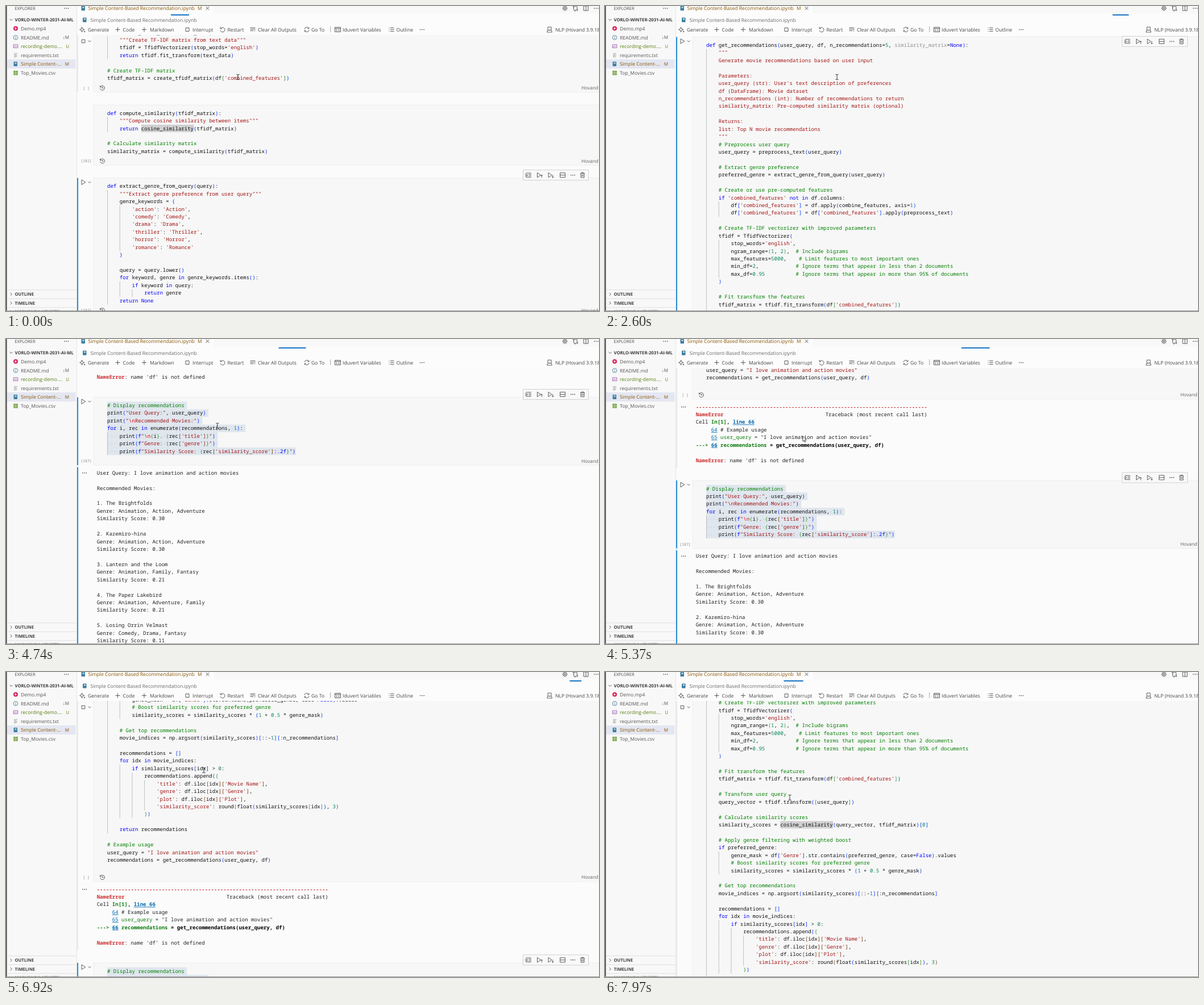
Animation of 1043x537 px, one loop 8000 ms. Source, as an HTML page:

```html
<!DOCTYPE html>
<html lang="en">
<head>
<meta charset="utf-8">
<title>Notebook</title>
<style>
html, body { margin: 0; width: 100%; height: 100%; overflow: hidden; background: #fcfcfc; }
svg { display: block; width: 100vw; height: 100vh; }
text { white-space: pre; text-rendering: geometricPrecision; font-family: "Open Sans", "Noto Sans", sans-serif; font-size: 8.65px; }
.mono text { font-family: "Noto Sans Mono", "DejaVu Sans Mono", monospace; font-size: 9.067px; }
.icon { fill: none; stroke: #4a4a4a; stroke-width: .9; }
</style>
</head>
<body>
<svg id="stage" viewBox="0 0 1043 537" preserveAspectRatio="none"></svg>
<script>
const LH = 13.43, CW = 5.44, CODE_X = 178, OUT_X = 159.7, LOOP = 8000;
const BLUE = '#0000ff', RED = '#a31515', GREEN = '#008000', ANSI_RED = '#cd3131', ANSI_GREEN = '#107c10', LINK = '#006ab1';
const BRACKETS = ['#0431fa', '#319331', '#7b3814'];
const KEYWORDS = /^(def|return|if|for|in|not|None|False)$/;

const CODE_A = String.raw`def create_tfidf_matrix(text_data):
    """Create TF-IDF matrix from text data"""
    tfidf = TfidfVectorizer(stop_words='english')
    return tfidf.fit_transform(text_data)

# Create TF-IDF matrix
tfidf_matrix = create_tfidf_matrix(df['combined_features'])`;

const CODE_B = String.raw`def compute_similarity(tfidf_matrix):
    """Compute cosine similarity between items"""
    return cosine_similarity(tfidf_matrix)

# Calculate similarity matrix
similarity_matrix = compute_similarity(tfidf_matrix)`;

const CODE_C = String.raw`def extract_genre_from_query(query):
    """Extract genre preference from user query"""
    genre_keywords = {
        'action': 'Action',
        'comedy': 'Comedy',
        'drama': 'Drama',
        'thriller': 'Thriller',
        'horror': 'Horror',
        'romance': 'Romance'
    }

    query = query.lower()
    for keyword, genre in genre_keywords.items():
        if keyword in query:
            return genre
    return None`;

const CODE_D = String.raw`def get_recommendations(user_query, df, n_recommendations=5, similarity_matrix=None):
    """
    Generate movie recommendations based on user input

    Parameters:
    user_query (str): User's text description of preferences
    df (DataFrame): Movie dataset
    n_recommendations (int): Number of recommendations to return
    similarity_matrix: Pre-computed similarity matrix (optional)

    Returns:
    list: Top N movie recommendations
    """
    # Preprocess user query
    user_query = preprocess_text(user_query)

    # Extract genre preference
    preferred_genre = extract_genre_from_query(user_query)

    # Create or use pre-computed features
    if 'combined_features' not in df.columns:
        df['combined_features'] = df.apply(combine_features, axis=1)
        df['combined_features'] = df['combined_features'].apply(preprocess_text)

    # Create TF-IDF vectorizer with improved parameters
    tfidf = TfidfVectorizer(
        stop_words='english',
        ngram_range=(1, 2),  # Include bigrams
        max_features=5000,    # Limit features to most important ones
        min_df=2,            # Ignore terms that appear in less than 2 documents
        max_df=0.95          # Ignore terms that appear in more than 95% of documents
    )

    # Fit transform the features
    tfidf_matrix = tfidf.fit_transform(df['combined_features'])

    # Transform user query
    query_vector = tfidf.transform([user_query])

    # Calculate similarity scores
    similarity_scores = cosine_similarity(query_vector, tfidf_matrix)[0]

    # Apply genre filtering with weighted boost
    if preferred_genre:
        genre_mask = df['Genre'].str.contains(preferred_genre, case=False).values
        # Boost similarity scores for preferred genre
        similarity_scores = similarity_scores * (1 + 0.5 * genre_mask)

    # Get top recommendations
    movie_indices = np.argsort(similarity_scores)[::-1][:n_recommendations]

    recommendations = []
    for idx in movie_indices:
        if similarity_scores[idx] > 0:
            recommendations.append({
                'title': df.iloc[idx]['Movie Name'],
                'genre': df.iloc[idx]['Genre'],
                'plot': df.iloc[idx]['Plot'],
                'similarity_score': round(float(similarity_scores[idx]), 3)
            })

    return recommendations

# Example usage
user_query = "I love animation and action movies"
recommendations = get_recommendations(user_query, df)
`;

const CODE_E = String.raw`# Display recommendations
print("User Query:", user_query)
print("\nRecommended Movies:")
for i, rec in enumerate(recommendations, 1):
    print(f"\n{i}. {rec['title']}")
    print(f"Genre: {rec['genre']}")
    print(f"Similarity Score: {rec['similarity_score']:.2f}")`;

// Output lines are lists of [text, colour, bold, underlined].
const ERROR_OUT = [
  [['-'.repeat(75), ANSI_RED, 1]],
  [['NameError', ANSI_RED, 1], [' '.repeat(33) + 'Traceback (most recent call last)']],
  [['Cell '], ['In[1]', ANSI_GREEN, 1], [', ', '#222', 1], ['line 66', LINK, 1, 1]],
  [['     '], ['64', LINK, 0, 1], [' # Example usage']],
  [['     '], ['65', LINK, 0, 1], [' user_query', ANSI_GREEN], [' = "I love animation and action movies"']],
  [['---> ', ANSI_GREEN, 1], ['66', LINK, 1, 1], [' recommendations', ANSI_GREEN, 1], [' = get_recommendations(user_query, df)', '#000', 1]],
  [],
  [['NameError', ANSI_RED, 1], [": name 'df' is not defined"]]
];
const MOVIES = [
  ['The Brightfolds', 'Animation, Action, Adventure', '0.30'],
  ['Kazemiro-hina', 'Animation, Action, Adventure', '0.30'],
  ['Lantern and the Loom', 'Animation, Family, Fantasy', '0.21'],
  ['The Paper Lakebird', 'Animation, Adventure, Family', '0.21'],
  ['Losing Orrin Velmast', 'Comedy, Drama, Fantasy', '0.11']
];
const MOVIE_OUT = ['User Query: I love animation and action movies', '', 'Recommended Movies:',
  ...MOVIES.flatMap(([name, genre, score], i) => ['', `${i + 1}. ${name}`, `Genre: ${genre}`, `Similarity Score: ${score}`])
].map(line => [[line]]);

const cells = [
  { code: CODE_A, label: '[ ]', history: true },
  { code: CODE_B, label: '[181]', history: true },
  { code: CODE_C, label: '[182]', history: true },
  { code: CODE_D, label: '[ ]', history: true, out: ERROR_OUT },
  { code: CODE_E, label: '[187]', out: MOVIE_OUT, selected: true }
];

// ---------- SVG helpers ----------
function el(parent, tag, attrs = {}) {
  const node = document.createElementNS('http://www.w3.org/2000/svg', tag);
  for (const k in attrs) node.setAttribute(k, attrs[k]);
  parent.appendChild(node);
  return node;
}
const rect = (p, x, y, w, h, fill, more) => el(p, 'rect', { x, y, width: w, height: h, fill, ...more });
const icon = (p, x, y, d, more) => el(p, 'path', { class: 'icon', d, transform: `translate(${x} ${y})`, ...more });
function label(p, x, y, str, fill = '#3f3f3f', size = 8.65, more = {}) {
  const t = el(p, 'text', { x, y: y + size * .36, fill, ...more });
  t.style.fontSize = size + 'px';
  t.textContent = str;
  return t;
}
function dots(p, x, y) {
  for (const d of [-3.2, 0, 3.2]) el(p, 'circle', { cx: x + d, cy: y, r: .85, fill: '#444' });
}
function spans(p, x, y, parts) {
  const t = el(p, 'text', { x, y: y + 3 });
  for (const [str, fill = '#222', bold, under] of parts) {
    const s = el(t, 'tspan', { fill });
    if (bold) s.setAttribute('font-weight', 700);
    if (under) s.setAttribute('text-decoration', 'underline');
    s.textContent = str;
  }
}

// ---------- syntax colours ----------
function bracket(ch, st) {
  if ('([{'.includes(ch)) return [ch, BRACKETS[st.depth++ % 3]];
  return [ch, BRACKETS[--st.depth % 3]];
}
function stringParts(str, isFormat, st) {
  const parts = [];
  for (const s of str.split(isFormat ? /(\{[^}]*\}|\\n)/ : /(\\n)/)) {
    if (s === '\\n') parts.push([s, '#ee0000']);
    else if (isFormat && s[0] === '{') {
      const [, body, spec] = s.match(/^\{(.*?)(:\.2f)?\}$/);
      parts.push(bracket('{', st), ...tokens(body, st));
      if (spec) parts.push([spec, BLUE]);
      parts.push(bracket('}', st));
    } else if (s) parts.push([s, RED]);
  }
  return parts;
}
function tokens(line, st) {
  if (st.doc || line.startsWith('"""')) {
    if ((line.match(/"""/g) || []).length === 1) st.doc = !st.doc;
    return [[line, RED]];
  }
  const parts = [];
  for (const [s] of line.matchAll(/#.*|f?"[^"]*"|'[^']*'|\d+(\.\d+)?|[A-Za-z_]\w*|[()[\]{}]|\s+|./g)) {
    if (s[0] === '#') parts.push([s, GREEN]);
    else if (s.startsWith('f"')) parts.push(['f', BLUE], ...stringParts(s.slice(1), true, st));
    else if (/^["']/.test(s)) parts.push(...stringParts(s, false, st));
    else if (/^\d/.test(s)) parts.push([s, '#098658']);
    else if (/^[()[\]{}]$/.test(s)) parts.push(bracket(s, st));
    else if (KEYWORDS.test(s)) parts.push([s, BLUE]);
    else parts.push([s, s === 'similarity_matrix' && line.startsWith('def') ? '#8c8c8c' : '#111']);
  }
  return parts;
}

// ---------- notebook ----------
const svg = document.getElementById('stage');
rect(svg, 0, 0, 1043, 537, '#fcfcfc');
rect(el(el(svg, 'defs'), 'clipPath', { id: 'view' }), 125, 51, 918, 486);
const view = el(svg, 'g', { 'clip-path': 'url(#view)' });
rect(view, 125, 51, 918, 486, '#fbfbfb');
const doc = el(view, 'g', { class: 'mono' });
const docLabels = el(view, 'g');
const HISTORY = 'M-3.6 -1.6A4 4 0 1 1 -3.9 1M-4 -4V-1.4H-1.4M0 -2.2V.4H2.2';

function buildCell(c) {
  const lines = c.code.split('\n'), st = { depth: 0, doc: false };
  const last = c.first + (lines.length - 1) * LH;
  c.top = c.first - 14.5;
  c.bottom = last + 24.5;
  rect(doc, 154, c.top, 900, c.bottom - c.top, '#f7f7f7', { stroke: '#ebebeb', 'stroke-width': .8 });
  const indent = i => lines[i].search(/\S/);
  lines.forEach((line, i) => {
    const y = c.first + i * LH;
    let depth = indent(i);
    if (depth < 0) {
      let a = i, b = i;
      while (a > 0 && indent(a) < 0) a--;
      while (b < lines.length - 1 && indent(b) < 0) b++;
      depth = Math.max(0, Math.min(indent(a), indent(b)));
    }
    if (c.selected) rect(doc, CODE_X, y - 6.7, line.length * CW + (i < lines.length - 1 ? 4 : 0), LH, '#dfe6ee');
    for (let k = 0; k < depth; k += 4) rect(doc, CODE_X + k * CW, y - 6.7, .8, LH, '#b2b2b2');
    const hit = line.indexOf('cosine_similarity');
    if (hit >= 0) rect(doc, CODE_X + hit * CW, y - 6.5, 17 * CW, 13, '#d0d0d0');
    if (c.selected) [...line].forEach((ch, k) => {
      if (ch === ' ') el(doc, 'circle', { cx: CODE_X + (k + .5) * CW, cy: y + .4, r: .55, fill: '#a9b0b8' });
    });
    const lead = Math.max(0, indent(i));
    if (line.trim()) spans(doc, CODE_X + lead * CW, y, tokens(line.slice(lead), st));
  });
  label(doc, 141, last + 17.3, c.label, '#858585', 6.5, { 'text-anchor': 'middle' });
  label(docLabels, 1012, last + 17, 'Hovand', '#616161', 8.3);
  if (c.history) icon(doc, 169.5, last + 17, HISTORY);
  c.end = c.bottom;
  if (c.out) {
    const y0 = last + 38.1;
    dots(doc, 138, y0);
    c.out.forEach((parts, i) => spans(doc, OUT_X, y0 + i * LH, parts));
    const lastOut = y0 + (c.out.length - 1) * LH;
    c.end = lastOut + 13.5;
    return lastOut + 50;
  }
  return last + 61.5;
}
let nextFirst = 46.6;
for (const c of cells) { c.first = nextFirst; nextFirst = buildCell(c); }
const [, , cellC, cellD, cellE] = cells;

// ---------- overlays in the notebook ----------
const hoverLine = rect(view, 125.6, 0, 1, 0, '#d9d9d9');
const selLine = rect(view, 125.2, 0, 1.7, 0, '#0078d4');
const selOutLine = rect(view, 125.2, 0, 1.7, 0, '#0078d4');
const CHEVRON = 'M8.6 -1.2L11 1.2L13.4 -1.2';
const play = icon(view, 0, 0, 'M-3 -4.2L3.8 0L-3 4.2Z' + CHEVRON);
const stop = icon(view, 0, 0, 'M-2.8 -2.8H2.8V2.8H-2.8Z' + CHEVRON);
const tools = el(view, 'g');
rect(tools, 909.5, -9, 115, 18, '#f9f9f9', { stroke: '#cccccc', 'stroke-width': .9 });
icon(tools, 919, 0, 'M-4.6 -2L-1 .2L-4.6 2.4ZM-4.6 -3.6H4.8M.4 -1.2H4.8M.4 1.2H4.8M-4.6 3.6H4.8');
icon(tools, 938, 0, 'M-3.5 -4.2L2.5 0L-3.5 4.2ZM4.2 4.5V-.5M2.5 1.2L4.2 -.6L5.9 1.2');
icon(tools, 957.5, 0, 'M-3.5 -4.2L2.5 0L-3.5 4.2ZM4.2 -.5V4.5M2.5 2.8L4.2 4.6L5.9 2.8');
icon(tools, 979, 0, 'M-4.4 -4H4.4V4H-4.4ZM-4.4 0H4.4');
dots(tools, 997, 0);
icon(tools, 1014, 0, 'M-4 -3H4M-1.5 -3V-4.5H1.5V-3M-3 -3V4.3H3V-3M-1 -1.2V2.6M1 -1.2V2.6');

// ---------- header ----------
const FILE = 'Simple Content-Based Recommendation.ipynb';
const noteIcon = (x, y) => {
  rect(svg, x - 3, y - 4, 6.5, 8, '#3f7f9f', { rx: .8 });
  rect(svg, x - 1, y - 2.5, 3, 2, '#d7e8ef');
};
rect(svg, 125, 0, 918, 13, '#f8f8f8');
rect(svg, 125, 0, 241, 14, '#fcfcfc');
noteIcon(135.5, 4);
label(svg, 144.5, 4, FILE, '#895503');
label(svg, 337, 4, 'M', '#895503', 8.4);
icon(svg, 354.5, 4, 'M-2.8 -2.8L2.8 2.8M2.8 -2.8L-2.8 2.8');
icon(svg, 983, 4, 'M-3.2 0A3.2 3.2 0 1 0 3.2 0A3.2 3.2 0 1 0 -3.2 0M-1.2 0A1.2 1.2 0 1 0 1.2 0A1.2 1.2 0 1 0 -1.2 0M0 -3.2V-4.7M0 3.2V4.7M-3.2 0H-4.7M3.2 0H4.7M2.3 2.3L3.4 3.4M-2.3 -2.3L-3.4 -3.4M2.3 -2.3L3.4 -3.4M-2.3 2.3L-3.4 3.4');
icon(svg, 1001.5, 4, 'M-3 -2V2.5Q-3 4 -1 4H.5M3 2V-2.5Q3 -4 1 -4H-.5M-1 2.5L.6 4L-1 5.5M1 -5.5L-.6 -4L1 -2.5M-4.2 -3A1.2 1.2 0 1 0 -1.8 -3A1.2 1.2 0 1 0 -4.2 -3M1.8 3A1.2 1.2 0 1 0 4.2 3A1.2 1.2 0 1 0 1.8 3');
icon(svg, 1020, 4, 'M-4 -4H4V4H-4ZM0 -4V4');
dots(svg, 1038, 4);
noteIcon(138, 24.5);
label(svg, 148.5, 24.5, FILE, '#6a6a6a');

const LIST = 'M-4.5 -3H4.5M-4.5 -.5H4.5M-4.5 2H1M2.5 3.2L4.5 1.2';
const PLUS = 'M-4 0H4M0 -4V4';
const toolbar = [
  [134.5, 'M-1 -4.5L.2 -1.2L3.5 0L.2 1.2L-1 4.5L-2.2 1.2L-5 0L-2.2 -1.2ZM3.5 2.2V4.8M2.2 3.5H4.8', 144, 'Generate'],
  [196.5, PLUS, 205.5, 'Code'],
  [243, PLUS, 253, 'Markdown'],
  [319, 'M-3 -3H3V3H-3Z', 328, 'Interrupt'],
  [381, 'M-3.4 -1.8A4 4 0 1 1 -3.9 1.4M-4 -4.6V-1.6H-1', 389.5, 'Restart'],
  [434, LIST, 443, 'Clear All Outputs'],
  [529, 'M-4 -.8A4 4 0 0 1 3.6 -1.8M3.8 -4V-1.6H1.4M4 .8A4 4 0 0 1 -3.6 1.8M-3.8 4V1.6H-1.4', 537, 'Go To'],
  [583.5, 'M-5 -4H5V4H-5ZM-5 -2H5M-3 .2H-1M-3 2H-1M1 .2H3M1 2H3', 592, 'Iduvert Variables'],
  [678, 'M-4.5 -3H-3.5M-2 -3H4.5M-4.5 0H-3.5M-2 0H4.5M-4.5 3H-3.5M-2 3H4.5', 686.5, 'Outline'],
  [956, 'M-3 -4.5H3V1H-3ZM-4.5 4.5L-3 1H3L4.5 4.5Z', 966, 'NLP (Hovand 3.9.18)']
];
for (const [ix, d, tx, str] of toolbar) {
  icon(svg, ix, 41.5, d);
  label(svg, tx, 41.5, str, '#444');
}
rect(svg, 570.3, 36, .9, 10, '#999');
dots(svg, 732, 41.5);
const progress = rect(svg, 0, 14.7, 0, 1.9, '#0067c0');

// ---------- sidebar ----------
rect(svg, 0, 0, 124.5, 537, '#f8f8f8');
rect(svg, 124, 0, .9, 537, '#e3e3e3');
label(svg, 15.5, 4, 'EXPLORER', '#4a4a4a', 7.5);
dots(svg, 106.5, 4);
icon(svg, 9, 24, 'M-2.6 -1.2L0 1.4L2.6 -1.2');
label(svg, 15.5, 24, 'VORLO-WINTER-2031-AI-ML', '#3b3b3b', 7.7, { 'font-weight': 700 });
rect(svg, 2, 94, 120.5, 16, '#e4e7f2');
const files = [
  ['Demo.mp4', '#555'], ['README.md', '#555', '↓M'], ['recording-demo....', '#587c0c', 'U'],
  ['requirements.txt', '#555'], ['Simple Content-...', '#895503', 'M'], ['Top_Movies.csv', '#555']
];
files.forEach(([name, fill, badge], i) => {
  const y = 40 + i * 15.6;
  label(svg, 26, y, name, fill, 8.55);
  if (badge) label(svg, 111, y, badge, fill, 8, { 'text-anchor': 'end' });
});
el(svg, 'circle', { cx: 17, cy: 39.5, r: 4, fill: '#dc2a5c' });
el(svg, 'path', { d: 'M15.8 37.5L19 39.5L15.8 41.5Z', fill: '#fff' });
icon(svg, 17, 55.5, 'M-3.8 0A3.8 3.8 0 1 0 3.8 0A3.8 3.8 0 1 0 -3.8 0M0 -2.2V-1.2M0 -.3V2.3', { style: 'stroke:#4d7d9d' });
icon(svg, 17, 71, 'M-3.8 -3H3.8V2.6H-3.8ZM-2.5 1.5L-.5 -1L1 .6L2.4 -.4', { style: 'stroke:#9a5aa8' });
icon(svg, 17, 86.8, 'M-3 -3H3M-3 -1H1.5M-3 1H3M-3 3H1.5', { style: 'stroke:#999' });
noteIcon(16.5, 102);
rect(svg, 13.2, 114, 7.6, 7.6, '#6f9e3c');
icon(svg, 17, 117.8, 'M-3.8 -1.2H3.8M-3.8 1.3H3.8M0 -3.8V3.8', { style: 'stroke:#eef5e4;stroke-width:.6' });
['OUTLINE', 'TIMELINE', 'MARVONDA KEYSETS'].forEach((name, i) => {
  const y = 507.4 + i * 15.5;
  rect(svg, 2, y - 8, 122, .9, '#dedede');
  icon(svg, 9, y, 'M-1.3 -2.6L1.3 0L-1.3 2.6');
  label(svg, 15.5, y, name, '#3b3b3b', 7.6, { 'font-weight': 700 });
});
rect(svg, 0, 0, 1.5, 537, '#3c3c3c');
rect(svg, 0, 536, 1043, 1, '#9a9a9a');

// ---------- pointer ----------
const beam = icon(svg, 0, 0, 'M-2.6 -4.6Q-.6 -4.6 0 -3.8Q.6 -4.6 2.6 -4.6M0 -4V4M-2.6 4.6Q-.6 4.6 0 3.8Q.6 4.6 2.6 4.6', { style: 'stroke:#222' });
const arrow = el(svg, 'path', { d: 'M0 0V9L2.1 7.1L3.5 10.2L4.9 9.6L3.5 6.6L6.3 6.4Z', fill: '#fff', stroke: '#222', 'stroke-width': .8 });

// ---------- timeline ----------
// Screen refreshes: [first, last, count]
const refreshes = [
  [0, 0, 1], [120, 120, 1], [460, 460, 1], [720, 1370, 5], [1510, 2480, 8], [2600, 2600, 1], [2750, 3530, 7],
  [3750, 3750, 1], [3940, 4740, 7], [5030, 5030, 1], [5370, 5370, 1], [5830, 5830, 1], [6220, 6220, 1],
  [6570, 6570, 1], [6920, 6920, 1], [7250, 7250, 1], [7540, 7970, 3]
].flatMap(([a, b, n]) => Array.from({ length: n }, (_, i) => n > 1 ? a + (b - a) * i / (n - 1) : a));

const scrollKeys = [[0, 0], [120, 256], [460, 511.3], [2600, 511.3], [3750, 1531.7], [4740, 1531.7], [5030, 1458.5], [5370, 1385.2], [6920, 1122.2], [7970, 848.5]];
const barKeys = [[0, .188], [460, .306], [1370, .452], [2480, .826], [2600, .86], [3750, 1.145], [5370, 1.569], [6920, 1.968], [7970, 2.216]];
const mouseX = [[0, 408], [4300, 408], [5030, 348], [6920, 348], [7970, 325]];
const mouseY = [[0, 125], [4300, 125], [5030, 171], [6920, 173], [7970, 221]];

function at(keys, t) {
  const i = keys.findIndex(k => k[0] > t);
  if (i < 0) return keys[keys.length - 1][1];
  const [t0, a] = keys[i - 1], [t1, b] = keys[i];
  return a + (b - a) * (t - t0) / (t1 - t0);
}
const show = (node, on) => node.setAttribute('display', on ? 'inline' : 'none');
const move = (node, x, y) => node.setAttribute('transform', `translate(${x} ${y})`);
function span(node, y0, y1) {
  node.setAttribute('y', y0);
  node.setAttribute('height', Math.max(0, y1 - y0));
}

function draw(time) {
  const t = refreshes.findLast(r => r <= time + .01);
  const s = at(scrollKeys, t), mx = at(mouseX, t), my = at(mouseY, t);
  move(doc, 0, -s);
  move(docLabels, 0, -s);

  const sel = t < 460 ? cellC : t < 3750 ? cellD : cellE;
  const hover = cells.find(c => my + s > c.top && my + s < c.end);
  const busy = t >= 460 && t < 720;
  span(selLine, sel.top - s, sel.bottom - s);
  span(selOutLine, sel.bottom - s + (sel.out ? 3.5 : 0), sel.end - s);
  show(hoverLine, hover && hover !== sel);
  if (hover) span(hoverLine, hover.top - s, hover.end - s);

  const stopCell = busy ? sel : hover !== sel && hover;
  show(play, !busy && sel.bottom - s > 110);
  move(play, 136, Math.max(62, sel.first - s - 7));
  show(stop, stopCell && stopCell.bottom - s > 110);
  if (stopCell) move(stop, 136, Math.max(62, stopCell.first - s - 7));
  show(tools, sel.bottom - s > 80);
  move(tools, 0, Math.max(62.3, sel.first - s - 19.6));

  // Indeterminate bar: grows to three times its width at mid-track.
  const p = at(barKeys, t) % 1, unit = 18.28;
  const shift = p < .5 ? 50 * p : 25 + 48 * (p - .5);
  const width = unit * (p < .5 ? 1 + 4 * p : 5 - 4 * p);
  progress.setAttribute('x', 125 + unit * (shift + .5) - width / 2);
  progress.setAttribute('width', width);

  const pointing = busy || !hover || my + s > hover.bottom;
  show(arrow, pointing);
  show(beam, !pointing);
  move(pointing ? arrow : beam, mx, my);
}

const start = performance.now();
function tick() {
  draw((performance.now() - start) % LOOP);
  requestAnimationFrame(tick);
}
tick();
</script>
</body>
</html>
```
